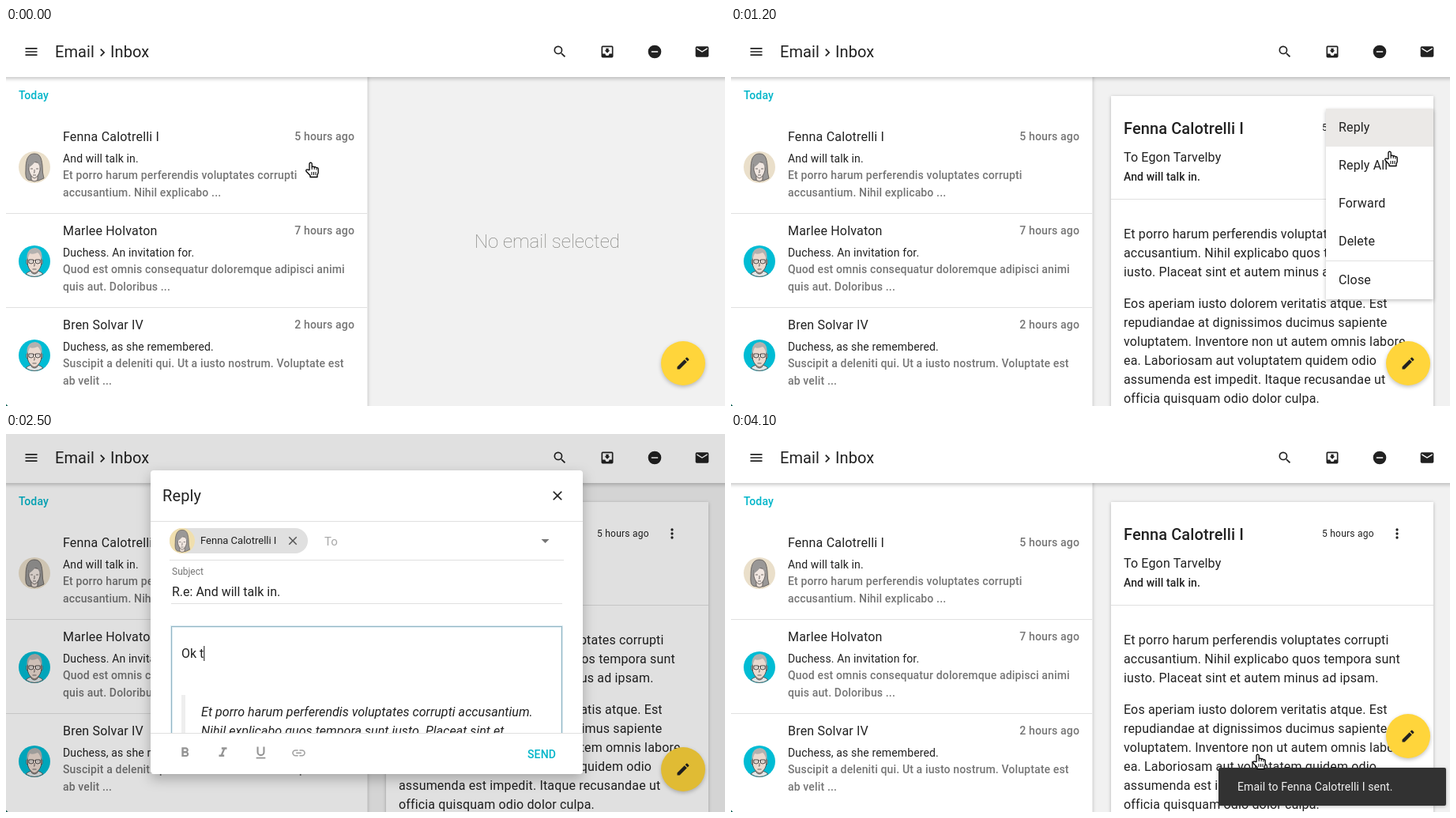
Write an HTML page that moves like this. It is 910 px wide and 478 px high and loops after 4.9 s.

```html
<!DOCTYPE html>
<html lang="en">
<head>
<meta charset="utf-8">
<title>Email inbox</title>
<style>
  html, body { margin: 0; width: 100%; height: 100%; overflow: hidden; }
  svg { display: block; width: 910px; height: 478px; }
  text { font-family: Roboto, "Noto Sans", sans-serif; fill: #212121; white-space: pre; }
  .title { font-size: 20px; letter-spacing: .005em; }
  .name { font-size: 16px; letter-spacing: .012em; }
  .body { font-size: 16px; letter-spacing: .01em; }
  .field { font-size: 16px; }
  .quoted { font-style: italic; letter-spacing: .004em; }
  .small { font-size: 14px; letter-spacing: .01em; }
  .caption { font-size: 12px; letter-spacing: .02em; }
  .medium { font-weight: 500; }
  .grey { fill: #757575; }
  .pale { fill: #a8a8a8; }
  .accent { fill: #00b5c9; }
  .end { text-anchor: end; }
  .raised { filter: drop-shadow(0 1px 2px rgba(0,0,0,.26)); }
  .floating { filter: drop-shadow(0 2px 2.5px rgba(0,0,0,.24)); }
  .modal { filter: drop-shadow(0 6px 8px rgba(0,0,0,.26)); }
</style>
</head>
<body>
<svg id="stage" viewBox="0 0 910 478"></svg>
<script>
const LOOP = 4900;
const SENDER = 'Fenna Calotrelli I';
const SUBJECT = 'And will talk in.';
const stage = document.getElementById('stage');

const ICONS = {
  menu: 'M3 18h18v-2H3zm0-5h18v-2H3zm0-7v2h18V6z',
  chevron: 'M10 6L8.59 7.41 13.17 12l-4.58 4.59L10 18l6-6z',
  search: 'M15.5 14h-.79l-.28-.27A6.5 6.5 0 1 0 13.73 14.43l.27.28v.79l5 4.99L20.49 19zm-6 0a4.5 4.5 0 1 1 0-9 4.5 4.5 0 0 1 0 9z',
  inbox: 'M19 3H5a2 2 0 0 0-2 2v14a2 2 0 0 0 2 2h14a2 2 0 0 0 2-2V5a2 2 0 0 0-2-2zm0 12h-4a3 3 0 0 1-6 0H5V5h14zm-3-5h-2V7h-4v3H8l4 4z',
  minus: 'M12 2a10 10 0 1 0 0 20 10 10 0 0 0 0-20zm5 11H7v-2h10z',
  mail: 'M20 4H4a2 2 0 0 0-2 2v12a2 2 0 0 0 2 2h16a2 2 0 0 0 2-2V6a2 2 0 0 0-2-2zm0 4l-8 5-8-5V6l8 5 8-5z',
  edit: 'M3 17.25V21h3.75L17.81 9.94l-3.75-3.75zM20.71 7.04a1 1 0 0 0 0-1.41l-2.34-2.34a1 1 0 0 0-1.41 0l-1.83 1.83 3.75 3.75z',
  more: 'M12 4a2 2 0 0 1 0 4 2 2 0 0 1 0-4zm0 6a2 2 0 0 1 0 4 2 2 0 0 1 0-4zm0 6a2 2 0 0 1 0 4 2 2 0 0 1 0-4z',
  close: 'M19 6.41L17.59 5 12 10.59 6.41 5 5 6.41 10.59 12 5 17.59 6.41 19 12 13.41 17.59 19 19 17.59 13.41 12z',
  bold: 'M15.6 10.79c.97-.67 1.65-1.77 1.65-2.79 0-2.26-1.75-4-4-4H7v14h7.04c2.09 0 3.71-1.7 3.71-3.79 0-1.52-.86-2.82-2.15-3.42zM10 6.5h3a1.5 1.5 0 0 1 0 3h-3zm3.5 9H10v-3h3.5a1.5 1.5 0 0 1 0 3z',
  italic: 'M10 4v3h2.21l-3.42 8H6v3h8v-3h-2.21l3.42-8H18V4z',
  underline: 'M12 17a6 6 0 0 0 6-6V3h-2.5v8a3.5 3.5 0 0 1-7 0V3H6v8a6 6 0 0 0 6 6zm-7 2v2h14v-2z',
  link: 'M3.9 12A3.1 3.1 0 0 1 7 8.9h4V7H7a5 5 0 0 0 0 10h4v-1.9H7A3.1 3.1 0 0 1 3.9 12zM8 13h8v-2H8zm9-6h-4v1.9h4a3.1 3.1 0 0 1 0 6.2h-4V17h4a5 5 0 0 0 0-10z'
};

const text = (x, y, cls, str, extra = '') => `<text x="${x}" y="${y}" class="${cls}" ${extra}>${str}</text>`;
const rect = (x, y, w, h, fill, extra = '') =>
  `<rect x="${x}" y="${y}" width="${w}" height="${h}" fill="${fill}" ${extra}/>`;
const rule = (x, y, w) => rect(x, y, w, 1, '#e0e0e0');
const icon = (name, x, y, fill = '#212121', size = 20) =>
  `<path d="${ICONS[name]}" fill="${fill}" transform="translate(${x} ${y}) scale(${size / 24}) translate(-12 -12)"/>`;
const lines = (x, y, step, cls, list) => list.map((s, i) => text(x, y + i * step, cls, s)).join('');

function woman(x, y, scale, bg) {
  return `<g transform="translate(${x} ${y}) scale(${scale})" stroke="#55504d" stroke-width=".8">
    <circle r="20" fill="${bg}" stroke="none"/>
    <path d="M-8 16Q-12 14-11 3C-11-12-7-17 0-17S9-12 10-2Q10 8 12 14L5 17H-3z" fill="#9a9897"/>
    <path d="M-4 10V16Q0 20 4 16V10z" fill="#e8dcd4"/>
    <path d="M-7-4Q0-9 7-4V4Q5 12 0 14Q-5 12-7 4z" fill="#f1e7e1"/>
    <path d="M-7.500 1Q-8-12 0-14Q8-12 8 1Q5-3 3-9Q-2-3-7.500 1z" fill="#9a9897" stroke="none"/>
    <path d="M-5 2h3M2 2h3M0 3v4h-1M-2 10h4" fill="none"/></g>`;
}

function man(x, y) {
  return `<g transform="translate(${x} ${y})" stroke="#4a4644" stroke-width=".8">
    <circle r="20" fill="#00bcd4" stroke="none"/>
    <path d="M-11 16Q-8 13-4 12H4Q8 13 11 16Q0 23-11 16z" fill="#dfe6e7"/>
    <path d="M-4 9V14Q0 18 4 14V9z" fill="#d8c3b8"/>
    <path d="M-8-2h-2v5l2 2zM8-2h2v5l-2 2z" fill="#e5d2c8"/>
    <path d="M-8.500-8Q0-22 8.500-8V5Q6 13 0 15Q-6 13-8.500 5z" fill="#ead9cf"/>
    <path d="M-9.500 0V-7Q-8-17 1-17Q9-16 9.500-7V0L7.500-6Q6-10 4-11Q-2-8-6-10L-7.500-6z" fill="#b3b1af" stroke="none"/>
    <path d="M-7-2h5.500v4Q-4 4-7 2zM1.500-2H7v4Q4 4 1.500 2z" fill="#f3eae5" stroke-width="1"/>
    <path d="M-1.500-1h3M-4.300-.2v1M4.300-.2v1M0 2v4h-1M-2.500 10h5" fill="none"/></g>`;
}

const mails = [
  [SENDER, '5 hours ago', SUBJECT,
    ['Et porro harum perferendis voluptates corrupti', 'accusantium. Nihil explicabo ...']],
  ['Marlee Holvaton', '7 hours ago', 'Duchess. An invitation for.',
    ['Quod est omnis consequatur doloremque adipisci animi', 'quis aut. Doloribus ...']],
  ['Bren Solvar IV', '2 hours ago', 'Duchess, as she remembered.',
    ['Suscipit a deleniti qui. Ut a iusto nostrum. Voluptate est', 'ab velit ...']]
];

const mailRow = ([name, age, subject, preview], i) => `<g transform="translate(0 ${i * 119})">
  ${i ? man(36, 176) : woman(36, 176, 1, '#eadfca')}
  ${text(72, 143, 'name', name)}${text(441, 142, 'small medium grey end', age)}
  ${text(72, 170, 'small', subject)}${lines(72, 191, 22, 'small medium grey', preview)}
  ${i < 2 ? rule(0, 234, 457) : ''}</g>`;

const card = `<g id="card">${rect(481, 86, 408, 410, '#fff', 'class="raised"')}
  ${text(497, 134, 'title medium', SENDER)}
  ${text(748, 130, 'caption', '5 hours ago')}${icon('more', 843, 126)}
  ${text(497, 169, 'body', 'To Egon Tarvelby')}${text(497, 193, 'small medium', SUBJECT)}
  ${rule(481, 216, 408)}
  ${lines(497, 266, 24, 'body', [
    'Et porro harum perferendis voluptates corrupti',
    'accusantium. Nihil explicabo quos tempora sunt',
    'iusto. Placeat sint et autem minus ad ipsam.'])}
  ${lines(497, 354, 24, 'body', [
    'Eos aperiam iusto dolorem veritatis atque. Est',
    'repudiandae at dignissimos ducimus sapiente',
    'voluptatem. Inventore non ut autem omnis labore',
    'ea. Laboriosam aut voluptatem quidem odio',
    'assumenda est impedit. Itaque recusandae ut',
    'officia quisquam odio dolor culpa.'])}</g>`;

const menu = `<g id="menu">${rect(753, 102, 136, 241, '#fff', 'class="floating"')}
  ${rect(753, 102, 136, 48, '#ebe9e7')}
  ${lines(769, 131, 48, 'body', ['Reply', 'Reply All', 'Forward', 'Delete'])}
  ${rule(753, 294, 136)}${text(769, 324, 'body', 'Close')}</g>`;

// An asterisk marks a word that the spelling checker underlines.
const quote = [
  'Et porro *harum perferendis *voluptates *corrupti *accusantium.',
  'Nihil *explicabo *quos tempora sunt *iusto. Placeat sint et',
  '*autem minus ad *ipsam.,Eos *aperiam *iusto *dolorem *veritatis'
];

const dialog = `<g id="dialog">${rect(183, 46, 547, 384, '#fff', 'rx="4" class="modal"')}
  ${text(198, 85, 'title', 'Reply')}${icon('close', 698, 78)}${rule(183, 110, 547)}
  ${rect(207, 119, 175, 32, '#e0e0e0', 'rx="16"')}${woman(223, 135, .8, '#f0dfae')}
  ${text(246, 139, '', SENDER, 'font-size="13"')}${icon('close', 363, 135, '#555', 18)}
  ${text(403, 141, 'pale', 'To', 'font-size="15"')}
  <path d="M677.500 133h10l-5 5z" fill="#757575"/>${rule(207, 159, 499)}
  ${text(210, 178, 'grey', 'Subject', 'font-size="12"')}
  ${text(210, 205, 'field', 'R.e: ' + SUBJECT)}${rule(209, 214, 495)}
  <g clip-path="url(#editor)">
    <rect x="209.500" y="243.500" width="494" height="180" fill="#fff" stroke="#e1eef4" stroke-width="3"/>
    <rect x="209.500" y="243.500" width="494" height="180" fill="none" stroke="#93b6c4"/>
    <g id="quote">${rect(222, 298, 5, 120, '#eee')}
      ${lines(247, 325, 24, 'field quoted', quote.map(s => s.replace(/\*/g, '')))}
      <g id="spelling" stroke="#e2705c" stroke-width="2" stroke-dasharray="2 1"></g></g>
    ${text(222, 283, 'field', '', 'id="typed"')}
    <rect id="caret" width="1" height="19" fill="#111"/>
  </g>
  ${rule(183, 378, 547)}
  <g clip-path="url(#footer)">${['bold', 'italic', 'underline', 'link'].map((n, i) =>
    `<g class="tool">${icon(n, 226.500 + i * 48, 403, '#949494')}</g>`).join('')}</g>
  ${rect(635, 387, 87, 36, '#ebebeb', 'rx="2" id="hover"')}
  ${text(660, 410, 'small medium accent', 'SEND')}</g>`;

stage.innerHTML = `<defs>
    <clipPath id="editor"><rect x="200" y="235" width="520" height="143"/></clipPath>
    <clipPath id="footer"><rect x="183" y="379" width="547" height="51"/></clipPath>
  </defs>
  ${rect(0, 0, 910, 478, '#f1f1f1')}
  <text id="empty" x="685" y="278" text-anchor="middle" font-size="24" font-weight="100" style="fill:#7c7c78">No email selected</text>
  ${card}
  ${rect(-10, 50, 467.500, 450, '#fff', 'class="raised"')}
  ${text(16, 90, 'small medium accent', 'Today')}${mails.map(mailRow).join('')}
  ${rect(-10, -10, 930, 72, '#fff', 'class="floating"')}
  ${icon('menu', 32, 30)}${text(62, 37, 'title', 'Email')}${icon('chevron', 122, 31)}${text(132, 37, 'title', 'Inbox')}
  ${['search', 'inbox', 'minus', 'mail'].map((n, i) => icon(n, 701 + i * 60, 30)).join('')}
  ${menu}
  <g id="toast">${rect(617, 422, 288, 48, '#323232', 'rx="2" class="raised"')}
    ${text(641, 451, 'small', `Email to ${SENDER} sent.`, 'style="fill:#f2f2f2"')}</g>
  <g id="fab"><circle cx="857" cy="424" r="28" fill="#ffd53b" class="floating"/>${icon('edit', 857, 424)}</g>
  <path d="M0 475.500L2.500 478H0z" fill="#0b5f53"/>
  <rect id="backdrop" width="910" height="478"/>
  ${dialog}
  <g id="cursor">
    <path id="arrow" d="M0 0V15l3.500-3.200L6 17.300l2.500-1.100L6.200 11H11z" fill="#000" stroke="#fff"/>
    <g id="hand" stroke="#000" stroke-linejoin="round">
      <path d="M-2 9.500V1.800a1.600 1.600 0 0 1 3.200 0V6a1.600 1.600 0 0 1 3 .5 1.500 1.500 0 0 1 2.800.6 1.300 1.300 0 0 1 2.200 1V13L8 16v2.500H-1v-2L-6 11.300a1.500 1.500 0 0 1 2.200-2z" fill="#fff" stroke-width="1.300"/>
      <path d="M1.200 6v3M4.200 7v2M7 8v1.500M1 12v4M3.500 12v4M6 12v4"/></g>
  </g>`;

const el = id => document.getElementById(id);
const [empty, cardEl, menuEl, toast, fab, backdrop, dialogEl, quoteEl, spelling, typed, caret, hover, cursor, arrow, hand] =
  ['empty', 'card', 'menu', 'toast', 'fab', 'backdrop', 'dialog', 'quote', 'spelling', 'typed', 'caret', 'hover', 'cursor', 'arrow', 'hand'].map(el);
const tools = [...stage.querySelectorAll('.tool')];
const quoted = [...stage.querySelectorAll('.quoted')];

quote.forEach((line, i) => {
  let at = 0;
  for (const part of line.split(' ')) {
    const word = part.replace(/\*/g, '');
    const letters = word.match(/^\w+/)[0].length;
    if (part[0] === '*') {
      const x = 247 + (at ? quoted[i].getSubStringLength(0, at) : 0);
      const w = quoted[i].getSubStringLength(at, letters);
      spelling.innerHTML += `<path d="M${x} ${328 + i * 24}h${w}"/>`;
    }
    at += word.length + 1;
  }
});

const progress = (t, start, length) => Math.min(1, Math.max(0, (t - start) / length));
const easeOut = (p, power) => 1 - (1 - p) ** power;
const show = (node, on) => node.setAttribute('visibility', on ? 'visible' : 'hidden');
const place = (node, transform, opacity) => {
  node.setAttribute('transform', transform);
  node.setAttribute('opacity', opacity);
};

// time, x, y of the pointer tip, 1 for the hand
const pointerPath = [
  [0, 386, 170, 1], [200, 386, 170, 1], [300, 455, 165, 1], [400, 610, 160, 0], [500, 727, 158, 0],
  [600, 800, 140, 0], [700, 839, 123, 1], [1000, 839, 123, 1], [1200, 834, 156, 1], [1300, 827, 136, 1],
  [1400, 827, 136, 0], [3000, 827, 136, 0], [3100, 852, 395, 0], [3200, 745, 402, 0], [3300, 667, 405, 1], [LOOP, 667, 405, 1]
];
const typing = [[2200, 'O'], [2300, 'Ok'], [2400, 'Ok '], [2500, 'Ok t'], [2600, 'Ok the'], [2700, 'Ok then']];

function movePointer(t) {
  const i = pointerPath.findIndex((key, n) => t >= key[0] && t < pointerPath[n + 1][0]);
  const [t0, x0, y0, isHand] = pointerPath[i];
  const [t1, x1, y1] = pointerPath[i + 1];
  const p = (t - t0) / (t1 - t0);
  cursor.setAttribute('transform', `translate(${x0 + (x1 - x0) * p} ${y0 + (y1 - y0) * p})`);
  const visible = t < 2200 || t >= 3100;
  show(hand, visible && isHand);
  show(arrow, visible && !isHand);
}

function render(t) {
  show(empty, t < 200);
  const slide = progress(t, 200, 500);
  place(cardEl, `translate(${416 * (1 - slide) ** 2} 0)`, easeOut(slide, 3));

  const unfold = easeOut(progress(t, 850, 250), 2);
  place(menuEl, `translate(889 102) scale(${.4 + .6 * unfold}) translate(-889 -102)`,
    unfold * (1 - progress(t, 1250, 150)));

  const closing = progress(t, 3420, 150);
  const dim = progress(t, 1250, 300) * (1 - closing);
  backdrop.setAttribute('opacity', .12 * dim);
  const open = easeOut(progress(t, 1280, 400), 3) * (1 - closing);
  const cx = 821 + (456.500 - 821) * open, cy = 126 + (238 - 126) * open;
  place(dialogEl, `translate(${cx} ${cy}) scale(${.2 + .8 * open}) translate(-456.500 -238)`, open);

  tools.forEach((tool, i) => {
    const p = progress(t, 1700 + i * 150, 400);
    place(tool, `translate(0 ${23 * (1 - p) ** 2})`, p);
  });

  const entry = typing.filter(([start]) => t >= start).pop();
  typed.textContent = entry ? entry[1] : '';
  quoteEl.setAttribute('transform', `translate(0 ${entry ? 32 : 0})`);
  spelling.setAttribute('opacity', entry ? 0 : 1);
  caret.setAttribute('x', 222 + (entry ? typed.getComputedTextLength() : 0));
  caret.setAttribute('y', entry ? 268 : 252);
  caret.setAttribute('opacity', t >= 2900 && t < 3100 ? 0 : 1);
  hover.setAttribute('opacity', t >= 3300 ? 1 : 0);

  const rise = easeOut(progress(t, 3600, 450), 3);
  place(toast, `translate(0 ${56 * (1 - rise)})`, rise);
  fab.setAttribute('transform', `translate(0 ${-42 * easeOut(progress(t, 3600, 400), 3)})`);
  movePointer(t);
}

const origin = performance.now();
function tick() {
  const t = (performance.now() - origin) % LOOP;
  render(Math.floor(t / 100) * 100);
  requestAnimationFrame(tick);
}
tick();
</script>
</body>
</html>
```
